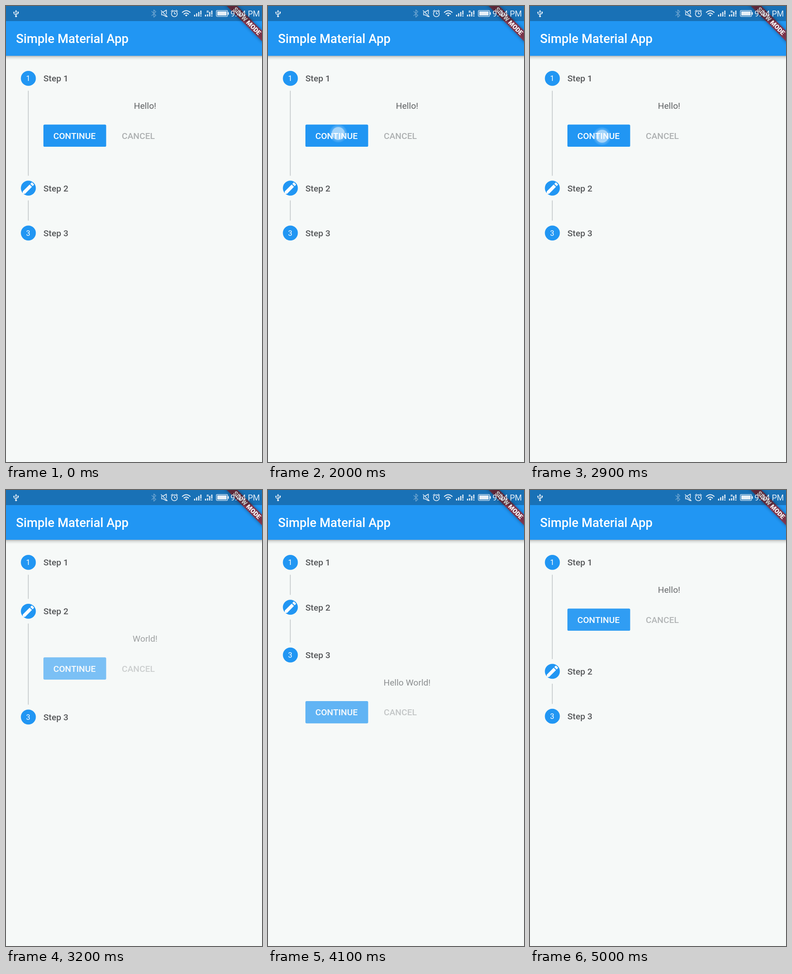
An HTML page for the animation above (5.1 s loop, 561 by 998 pixels).

```html
<!DOCTYPE html>
<html lang="en">
<head>
<meta charset="utf-8">
<title>Stepper</title>
<style>
html, body { margin: 0; width: 100%; height: 100%; overflow: hidden; background: #f6f9f8; }
svg { display: block; width: 100vw; height: 100vh; font-family: Roboto, sans-serif; }
.medium { font-weight: 500; }
.body { font-size: 19.1px; }
.icon { fill: none; stroke: #e6eff7; stroke-width: 1.5; stroke-linecap: round; stroke-linejoin: round; }
.solid { fill: #e6eff7; stroke: none; }
</style>
</head>
<body>
<svg viewBox="0 0 561 998" preserveAspectRatio="none">
  <defs>
    <linearGradient id="drop" x2="0" y2="1">
      <stop offset="0" stop-color="#000" stop-opacity=".26"/>
      <stop offset=".4" stop-color="#000" stop-opacity=".1"/>
      <stop offset="1" stop-color="#000" stop-opacity="0"/>
    </linearGradient>
    <filter id="blur" x="-20%" y="-100%" width="140%" height="300%"><feGaussianBlur stdDeviation="3.5"/></filter>
    <radialGradient id="halo">
      <stop offset=".68" stop-color="#fff" stop-opacity=".28"/>
      <stop offset="1" stop-color="#fff" stop-opacity=".04"/>
    </radialGradient>
  </defs>
  <rect width="561" height="998" fill="#f6f9f8"/>
  <g id="steps"></g>

  <rect y="109" width="561" height="9" fill="url(#drop)"/>
  <rect width="561" height="109" fill="#2196f3"/>
  <text class="medium" x="22" y="80.5" font-size="27.27" fill="#fff">Simple Material App</text>

  <g transform="translate(561 0) rotate(45)">
    <rect x="-70" y="38.2" width="140" height="16.4" filter="url(#blur)" opacity=".4"/>
    <rect x="-70" y="38.2" width="140" height="16.4" fill="#b71c1c" fill-opacity=".627"/>
    <text x="0" y="51.3" font-size="13.9" font-weight="900" text-anchor="middle" fill="#fff">SLOW MODE</text>
  </g>
  <rect width="561" height="33" fill-opacity=".25"/>

  <g class="icon">
    <path d="M22 11V22M22 20L17.5 17V14.5M22 18.5L26.5 16.5V14"/>
    <path class="solid" d="M22 8.5L24.3 12.5H19.7Z"/>
    <circle class="solid" cx="22" cy="22.5" r="2.1"/>
    <circle class="solid" cx="17.5" cy="14" r="1.6"/>
    <rect class="solid" x="25" y="12.5" width="3" height="3"/>
    <path d="M319.5 12L328.5 20.5L324 24.5V8.5L328.5 12.5L319.5 21" opacity=".4"/>
    <path d="M340 10L353.5 23.5M341 13.5V19.5H344.5L351.5 23.5V21M344.5 13L351.5 9V17.5"/>
    <circle cx="369" cy="17" r="6.5"/>
    <path d="M369 13.2V17.2H372M362 11.5L365 9M376 11.5L373 9"/>
    <path d="M386.5 14Q395 6.5 403.5 14M390 17.6Q395 13.2 400 17.6" stroke-width="2.1"/>
    <path class="solid" d="M392.2 20Q395 18 397.8 20L395 23Z"/>
    <g id="bars" class="solid"></g>
    <rect x="461" y="9.8" width="24.5" height="13" rx="1.5" stroke-width="1.3"/>
    <rect class="solid" x="463" y="11.8" width="20.5" height="9"/>
    <rect class="solid" x="486" y="13.5" width="2.2" height="5.6"/>
  </g>
  <text x="439.5" y="14.5" font-size="8" font-weight="700" fill="#e6eff7">R</text>
  <text x="492" y="22.6" font-size="17.5" fill="#e6eff7">9:44 PM</text>

  <g id="touch">
    <circle r="20" fill="url(#halo)"/>
    <circle r="14" fill="#fff" fill-opacity=".43"/>
  </g>
</svg>
<script>
const LOOP = 5100, TICK = 100, FADE = 200;
const TOP = 158.4, PITCH = 98.2, EXTRA = 142, BODY = 49.1;
const messages = ["Hello!", "World!", "Hello World!"];
const moves = [
  { at: 3060, from: 0, to: 1 },
  { at: 3952, from: 1, to: 2 },
  { at: 4828, from: 2, to: 0 }
];
const touches = [
  { on: 2000, off: 2300, x: 154, y: 279 },
  { on: 2900, off: 3100, x: 158, y: 285 },
  { on: 3900, off: 4000, x: 156, y: 379 },
  { on: 4700, off: 4900, x: 149, y: 482 }
];
const pencil = "M3 17.25V21h3.75L17.81 9.94l-3.75-3.75L3 17.25zM20.71 7.04c.39-.39.39-1.02 0-1.41" +
  "l-2.34-2.34c-.39-.39-1.02-.39-1.41 0l-1.83 1.83 3.75 3.75 1.83-1.83z";

const byId = id => document.getElementById(id);
const clamp = v => Math.min(1, Math.max(0, v));

// cubic-bezier(.4, 0, .2, 1)
function ease(x) {
  x = clamp(x);
  if (x === 0 || x === 1) return x;
  let lo = 0, hi = 1;
  for (let i = 0; i < 24; i++) {
    const s = (lo + hi) / 2, r = 1 - s;
    if (1.2 * r * r * s + 0.6 * r * s * s + s * s * s < x) lo = s; else hi = s;
  }
  return lo * lo * (3 - 2 * lo);
}

function badge(i) {
  return i === 1
    ? `<path d="${pencil}" fill="#fff" transform="translate(49 0) scale(1.364) translate(-12 -12)"/>`
    : `<text x="48.7" y="5.8" font-size="16.4" text-anchor="middle" fill="#fff">${i + 1}</text>`;
}

byId("steps").innerHTML = messages.map((message, i) => `
  <clipPath id="clip${i}"><rect y="${BODY}" width="561" height="0"/></clipPath>
  <g id="step${i}">
    <circle cx="49" r="16.4" fill="#2196f3"/>
    ${badge(i)}
    <text class="medium body" x="82" y="6.9" fill="#56585a">Step ${i + 1}</text>
    <line x1="48.8" x2="48.8" y1="27" stroke="#bcc0c1" stroke-width="1.4"/>
    <g clip-path="url(#clip${i})"><g class="content">
      <text class="body" x="304.8" y="66.6" text-anchor="middle" fill="#5d6062">${message}</text>
      <rect x="82" y="101" width="137.5" height="48.7" rx="2.7" fill="#2196f3"/>
      <text class="medium body" x="103.7" y="132.3" fill="#fff">CONTINUE</text>
      <text class="medium body" x="253.7" y="132.3" fill="#adb0b1">CANCEL</text>
    </g></g>
  </g>`).join("");

byId("bars").innerHTML = [412, 436].map((x, k) =>
  [0, 1, 2, 3].map(i => {
    const h = k && i === 1 ? 5 : 4 + 3 * i;
    return `<rect x="${x + i * 4.6}" y="${23 - h}" width="2.5" height="${i === 3 ? h - 4 : h}"/>`;
  }).join("") + `<rect x="${x + 13.8}" y="20.6" width="2.5" height="2.4"/>`).join("");

const steps = messages.map((_, i) => {
  const root = byId("step" + i);
  return {
    root,
    line: root.querySelector("line"),
    clip: byId("clip" + i).firstElementChild,
    content: root.querySelector(".content")
  };
});

function pose(t) {
  const open = [1, 0, 0], alpha = [1, 0, 0];
  for (const { at, from, to } of moves) {
    if (t < at) break;
    const p = clamp((t - at) / FADE);
    open[to] = ease(p);
    open[from] = 1 - open[to];
    alpha[to] = ease((p - 0.4) / 0.6) ** 2.2;
    alpha[from] = 1 - ease(p / 0.6);
  }
  return { open, alpha };
}

function draw(t) {
  const { open, alpha } = pose(t);
  let y = TOP;
  steps.forEach((step, i) => {
    const size = EXTRA * open[i];
    step.root.setAttribute("transform", `translate(0 ${y.toFixed(2)})`);
    step.line.setAttribute("y2", i < 2 ? PITCH + size - 27 : 27);
    step.clip.setAttribute("height", size);
    step.content.setAttribute("opacity", alpha[i]);
    y += PITCH + size;
  });
  const tap = touches.find(p => t >= p.on && t < p.off);
  const dot = byId("touch");
  dot.setAttribute("visibility", tap ? "visible" : "hidden");
  if (tap) dot.setAttribute("transform", `translate(${tap.x} ${tap.y})`);
}

const start = performance.now();
function loop() {
  const t = (performance.now() - start) % LOOP;
  draw(Math.floor(t / TICK) * TICK);
  requestAnimationFrame(loop);
}
loop();
</script>
</body>
</html>
```
